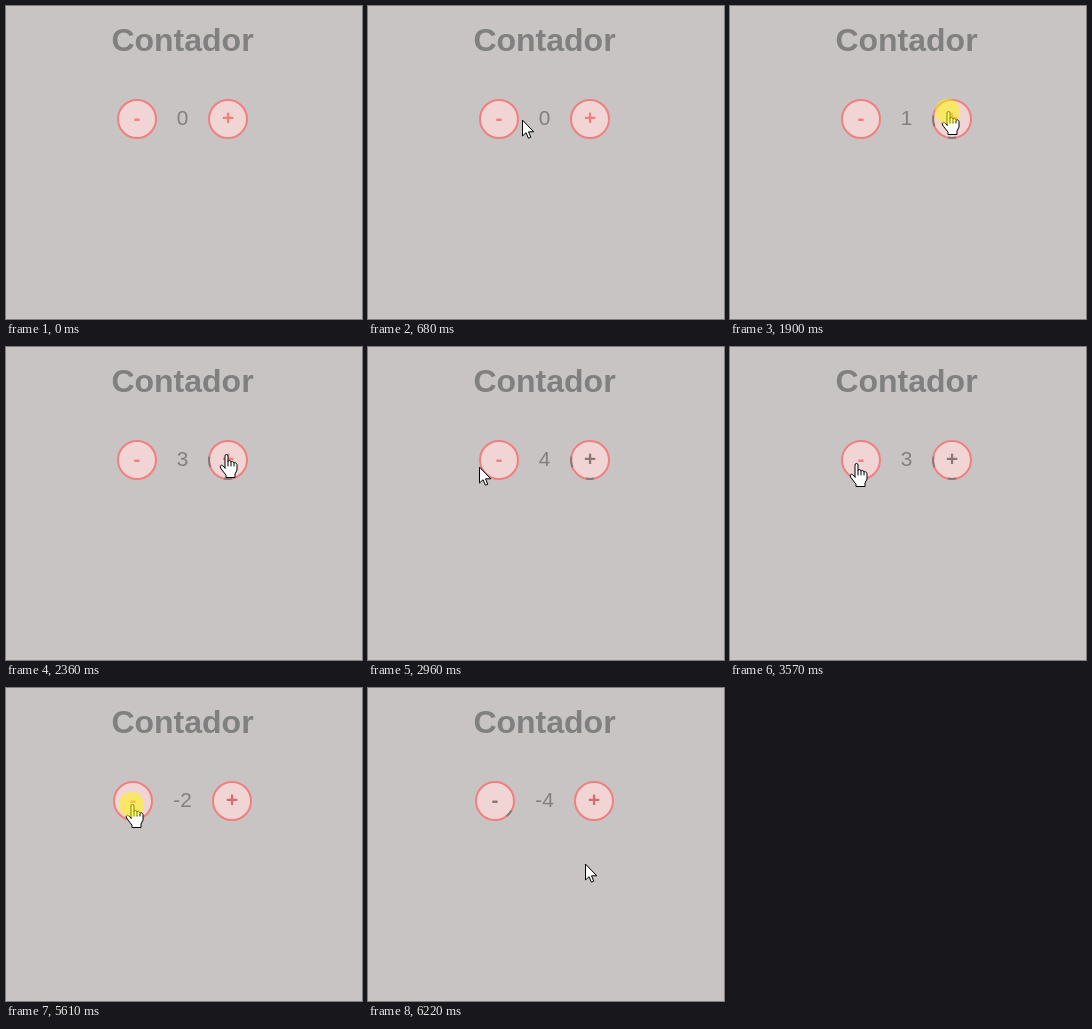
Animation of 356 by 313 pixels, one loop 6290 ms. Source, as an HTML page:

```html
<!DOCTYPE html>
<html lang="es">
<head>
<meta charset="utf-8">
<title>Contador</title>
<style>
  html, body { margin: 0; width: 100%; height: 100%; overflow: hidden; background: #c8c4c3; }
  svg { display: block; width: 356px; height: 313px; }
  text { font-family: "Liberation Sans", Arial, sans-serif; font-size: 20.8px; text-anchor: middle; fill: #808080; }
  .title { font-size: 32px; font-weight: bold; }
  .sign { font-weight: bold; fill: #f08080; }
  .face { fill: #f0d5d4; stroke: #f08080; stroke-width: 2; }
  .shade { fill: none; stroke: #817a7a; stroke-width: 2; }
  .cursor path { fill: #fff; stroke: #000; stroke-linejoin: round; stroke-linecap: round; }
</style>
</head>
<body>
<svg viewBox="0 0 356 313">
  <text class="title" x="176.5" y="45">Contador</text>
  <g id="minus">
    <circle class="face" r="19"/>
    <path class="shade" d="M16.5 9.5A19 19 0 0 1 11.7 15"/>
    <text class="sign" y="6">-</text>
  </g>
  <text id="count" x="176.5" y="119">0</text>
  <g id="plus">
    <circle class="face" r="19"/>
    <path class="shade" d="M4 18.6A19 19 0 0 1 -4 18.6M-17.6 7.1A19 19 0 0 1 -18.7 -3.3"/>
    <text class="sign" y="6">+</text>
  </g>
  <g class="cursor">
    <path id="arrow" d="M.5 .5V16L4.1 12.7L6.4 18.2L8.8 17.2L6.5 11.8H11.4Z"/>
    <g id="hand">
      <path d="M-1.5 14V2Q-1.5 .5 0 .5T1.5 2V7.5Q1.7 6.5 3 6.5T4.5 8.2Q4.8 7.2 6 7.4T7.5 9.2Q7.8 8.4 9 8.8T10.5 10.5V16L8.5 20V23.5H-.5V21.2L-6 14Q-7 11.8 -5.2 11.2Q-4 11 -1.5 14Z"/>
      <path d="M1.5 7.5V12M4.5 8.5V12M7.5 9.5V12" style="fill:none"/>
    </g>
  </g>
  <circle id="press" r="12.5" fill="#fffa00" fill-opacity=".52"/>
</svg>
<script>
const LOOP = 6290;
const STEP = 67;   // the pointer is redrawn at this interval
const HOLD = 100;  // how long a click is held down
const LEAVE_PLUS = 2760, LEAVE_MINUS = 6080;
const $ = id => document.getElementById(id);

// Release times spread from first to last; a power below 1 speeds up the run
const run = (first, last, n, add, power = 1) => Array.from({ length: n }, (_, i) =>
  ({ add, up: first + (last - first) * (i / (n - 1)) ** power }));

const clicks = [
  ...run(1560, 2754, 4, 1),
  ...run(3570, 4569, 4, -1),
  ...run(4810, 5950, 4, -1, 0.75)
];

const entry = { x: 280, y: 278 };
const moves = [
  { start: 200, end: 820, x: 147, y: 106 },
  { start: 820, end: 1300, x: 218, y: 105 },
  { start: 2290, end: 2360, x: 220, y: 107 },
  { start: LEAVE_PLUS, end: 2960, x: 111, y: 120 },
  { start: 3030, end: 3300, x: 126, y: 116 },
  { start: LEAVE_MINUS, end: 6220, x: 217, y: 176 }
];

const easeOut = p => 1 - (1 - p) ** 2;

function pointerAt(t) {
  let { x, y } = entry;
  for (const m of moves) {
    if (t < m.start) break;
    const steps = Math.round((m.end - m.start) / STEP);
    const passed = Math.floor((t - m.start) / (m.end - m.start) * steps + 0.1);
    const p = easeOut(Math.min(1, passed / steps));
    x += (m.x - x) * p;
    y += (m.y - y) * p;
  }
  return { x: Math.round(x), y: Math.round(y) };
}

function place(el, x, y) {
  el.setAttribute("transform", `translate(${x} ${y})`);
}

function show(el, on) {
  el.style.display = on ? "" : "none";
}

function drawButton(el, x, shaded, signColor) {
  place(el, x, 113);
  show(el.querySelector(".shade"), shaded);
  el.querySelector(".sign").style.fill = signColor;
}

function draw(t) {
  const count = clicks.reduce((sum, c) => sum + (t >= c.up ? c.add : 0), 0);
  const shift = count < 0 ? 4 : 0;  // the minus sign widens the row
  const minusX = 131 - shift, plusX = 222 + shift;
  $("count").textContent = count;

  const left = t >= LEAVE_MINUS + STEP;
  drawButton($("minus"), minusX, left, left ? "#857878" : "#f08080");
  const plusColor = shift ? "#d66c6e" : t >= LEAVE_PLUS ? "#8d7676" : "#f08080";
  drawButton($("plus"), plusX, t >= 1160 && !shift, plusColor);

  const { x, y } = pointerAt(t);
  const visible = t >= moves[0].start;
  const over = [minusX, plusX].some(cx => Math.hypot(x - cx, y - 113) < 20);
  show($("arrow"), visible && !over);
  show($("hand"), visible && over);
  show($("press"), clicks.some(c => t >= c.up - HOLD && t < c.up));
  place($("arrow"), x, y);
  place($("hand"), x + 0.5, y);
  place($("press"), x - 0.5, y + 0.5);
}

function tick() {
  draw(performance.now() % LOOP);
  requestAnimationFrame(tick);
}
tick();
</script>
</body>
</html>
```
